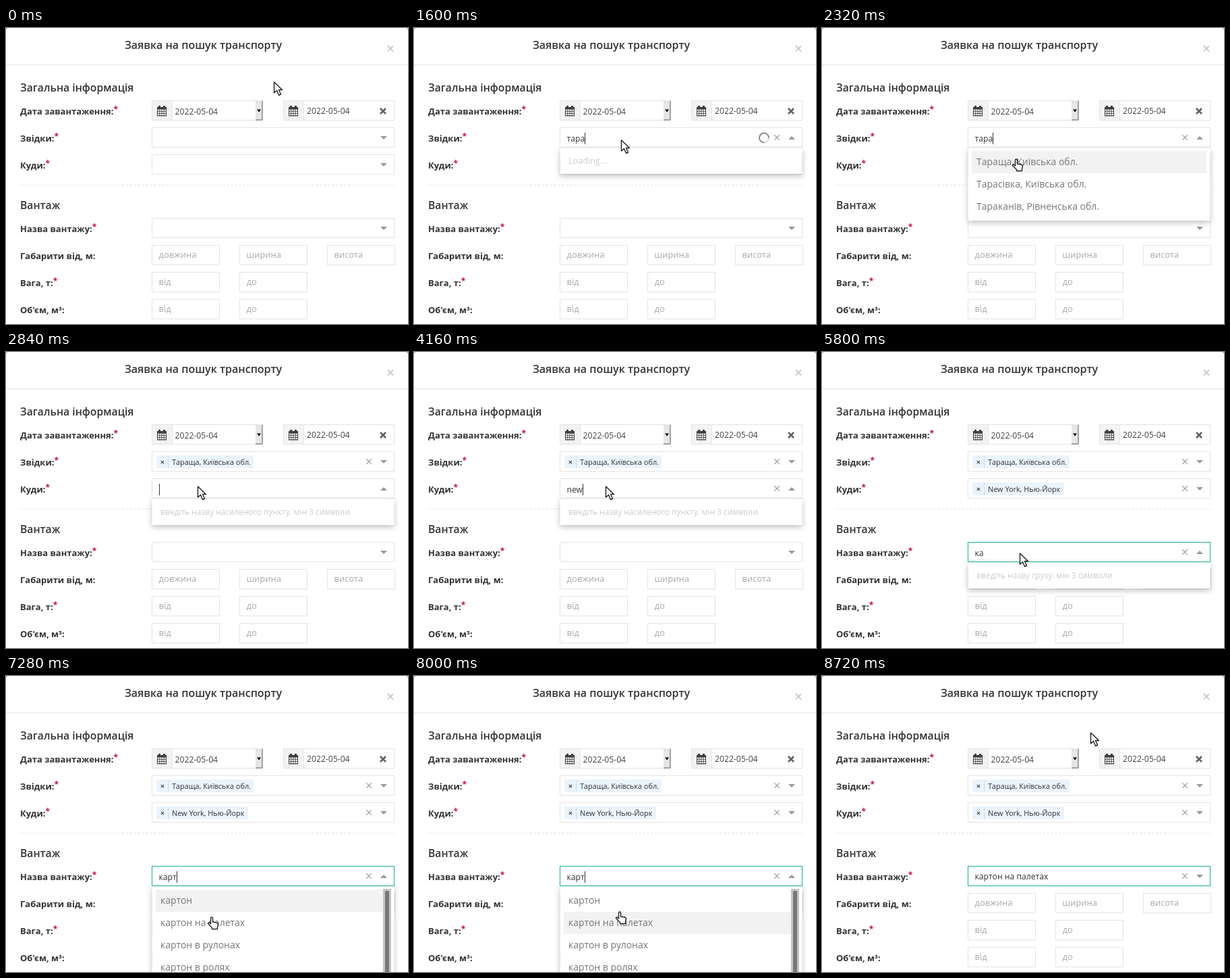
Write an HTML page that moves like this. It is 596x438 px and loops after 8.92 s.

```html
<!DOCTYPE html>
<html lang="uk">
<head>
<meta charset="utf-8">
<style>
html, body { margin: 0; width: 100%; height: 100%; overflow: hidden; background: #fff; }
svg { display: block; font: 13px "Open Sans", "Noto Sans", sans-serif; }
.menu { filter: drop-shadow(0 3px 4px rgba(0, 0, 0, .25)); }
</style>
</head>
<body>
<svg id="stage" width="596" height="438" viewBox="0 0 596 438"></svg>
<script>
const LOOP = 8920, VALUE_SIZE = 12.2;
const stage = document.getElementById("stage");

const text = (x, y, s, fill = "#444", size = 13, weight = 400) =>
  `<text x="${x}" y="${y}" fill="${fill}" font-size="${size}" font-weight="${weight}">${s}</text>`;
const rect = (x, y, w, h, fill, more = "") =>
  `<rect x="${x}" y="${y}" width="${w}" height="${h}" fill="${fill}" ${more}/>`;
const path = (d, fill, more = "") => `<path d="${d}" fill="${fill}" ${more}/>`;
const box = (x, y, w, h, stroke = "#e3e4e5", fill = "#fff") =>
  rect(x + .5, y + .5, w - 1, h - 1, fill, `stroke="${stroke}"`);
const cross = (x, y, r, color, width) =>
  path(`M${x - r} ${y - r}l${2 * r} ${2 * r}m0 ${-2 * r}l${-2 * r} ${2 * r}`, "none",
    `stroke="${color}" stroke-width="${width}"`);
const label = (y, s) => text(21, y,
  s.replace("*", '<tspan dy="-3" font-size="12" fill="#c4104a">*</tspan>'), "#333", 13, 700);

function calendar(x) {
  let s = box(x, 107, 31, 30, "#e3e4e5", "#f3f3f3") +
    rect(x + 8, 117, 14, 13.5, "#3c3c3c") + rect(x + 10, 115, 3, 4, "#3c3c3c") + rect(x + 17, 115, 3, 4, "#3c3c3c");
  for (let i = 0; i < 12; i++)
    s += rect(x + 9 + i % 4 * 3.2, 120.5 + (i >> 2) * 3.2, 2.4, 2.4, "#f3f3f3");
  return s;
}

function form() {
  const dates = box(216, 107, 165, 30) + calendar(216) + text(250.5, 128, "2022-05-04", "#444", VALUE_SIZE) +
    rect(370, 108, 10, 28, "#e6e6e6") + path("M380 108v28h-10", "none", 'stroke="#888" stroke-width="1.4"') +
    path("M372 120.5h6l-3 4z", "#000") +
    box(411, 107, 165, 30) + calendar(411) + text(446, 127, "2022-05-04", "#444", VALUE_SIZE) +
    cross(559, 123, 4, "#666", 2.8);
  const inputs = [[216, 321, "довжина"], [346, 321, "ширина"], [476, 321, "висота"],
    [216, 361, "від"], [346, 361, "до"], [216, 401, "від"], [346, 401, "до"]]
    .map(([x, y, s]) => box(x, y, 101, 30) + text(x + 10.5, y + 19, s, "#aaa")).join("");
  return rect(0, 0, 596, 438, "#fff") + path("M0 0h3q-3 0-3 3zM596 0h-3q3 0 3 3z", "#777") +
    text(176, 31, "Заявка на пошук транспорту", "#333", 16, 600) +
    cross(570, 30.5, 4, "#ccc", 2) + rect(0, 54, 596, 1, "#e5e5e5") +
    text(21, 94, "Загальна інформація", "#333", 15.7, 600) +
    text(21, 268, "Вантаж", "#333", 15.7, 600) +
    path("M21 232.5H576", "none", 'stroke="#e4e6e8" stroke-dasharray="4 2"') +
    label(128, "Дата завантаження:*") + label(168, "Звідки:*") + label(208, "Куди:*") +
    label(302, "Назва вантажу:*") + label(342, "Габарити від, м:") +
    label(382, "Вага, т:*") + label(422, "Об'єм, м³:") + dates + inputs;
}

// Times in ms: keys = one per typed letter, off = spans with the caret blinked out.
const fields = [
  { y: 147, open: 560, word: "тара", keys: [1000, 1120, 1200, 1320], load: 1600, list: 1960, pick: 2560,
    hint: "введіть назву населеного пункту. мін 3 символи", value: "Тараща, Київська обл.", chip: 144,
    off: [], items: ["Тараща, Київська обл.", "Тарасівка, Київська обл.", "Тараканів, Рівненська обл."] },
  { y: 187, open: 2760, word: "new", keys: [3840, 3960, 4080], load: 4280, list: 4480, pick: 4880,
    hint: "введіть назву населеного пункту. мін 3 символи", value: "New York, Нью-Йорк", chip: 136,
    off: [[3080, 3400]], items: ["New York, Нью-Йорк", "New Haven, Коннектикут", "Ньюпорт, Уельс",
      "Newport News, Вірджинія", "Newark, Нью-Джерсі", "Ньюкасл-Апон-Тайн, Англія",
      "New Westminster, Британська Колумбія"] },
  { y: 281, open: 5200, word: "карт", keys: [5560, 5720, 5880, 6000], load: 6200, list: 6400, pick: 8040,
    hint: "введіть назву грузу. мін 3 символи", value: "картон на палетах",
    off: [[5760, 5860], [6480, 6980], [7480, 7980]], items: ["картон", "картон на палетах", "картон в рулонах",
      "картон в ролях"] }
];

const pen = document.createElement("canvas").getContext("2d");
function textWidth(s) {
  pen.font = VALUE_SIZE + 'px "Open Sans", "Noto Sans", sans-serif';
  return pen.measureText(s).width;
}

function spinner(y, angle) {
  return `<g transform="rotate(${angle} 519 ${y})" stroke-width="2">` +
    path(`M519 ${y + 7}a7 7 0 0 0 7-7`, "none", 'stroke="#ddd"') +
    path(`M519 ${y + 7}a7 7 0 1 1 7-7`, "none", 'stroke="#888"') + "</g>";
}

function field(f, t) {
  const { y } = f, picked = t >= f.pick, open = t >= f.open && !picked;
  const typed = f.word.slice(0, f.keys.filter(k => t >= k).length);
  let s = box(216, y, 360, 30, !f.chip && t >= f.open ? "#1ab394" : "#e3e4e5");
  s += path(open ? `M555 ${y + 18}h10l-5-5z` : `M555 ${y + 13}h10l-5 5z`, "#999");
  if (picked || typed) s += cross(538, y + 15, 3.8, "#999", 1.2);
  if (picked && f.chip)
    s += rect(223, y + 6, f.chip, 19, "#ebf4fd", 'rx="2"') +
      rect(240, y + 6, 1, 19, "#c2def6") + cross(232, y + 16, 2.2, "#444", 1.1) +
      text(246, y + 20, f.value, "#333", 10.9);
  else if (picked) s += text(226.5, y + 20, f.value, "#333", VALUE_SIZE);
  else if (open) {
    s += text(226.5, y + 21, typed, "#333", VALUE_SIZE);
    if (!f.off.some(([a, b]) => t >= a && t < b))
      s += rect(Math.round(226.5 + textWidth(typed)), y + 8, 1, 17, "#333");
    if (t >= f.load && t < f.list) s += spinner(y + 15.5, (t - f.load) * .9);
  }
  return s;
}

function menu(f, t) {
  if (t < f.open || t >= f.pick) return "";
  const top = f.y + 30, listed = t >= f.list, n = f.items.length;
  const height = !listed ? 39 : n == 3 ? 108 : 260;
  let s = `<g class="menu">${rect(216.5, top, 359, height, "#fff")}</g>`;
  if (!listed) return s + (t >= f.load
    ? text(229, top + 24, "Loading...", "#ccc", 12.6)
    : text(229, top + 24, f.hint, "#ccc", 12));
  const active = !f.chip && t >= 7300 ? 1 : 0;
  s += rect(222, top + 5 + active * 33, n == 3 ? 348 : 337, 33, "#f2f2f2");
  f.items.forEach((item, i) => s += text(229, top + 26 + i * 33, item, "#777", 14));
  if (n > 3) s += rect(559, top + 4, 12, 260, "#c4c4c4") + rect(562, top + 7, 6, 157, "#777", 'rx="1"');
  return s;
}

// Pointer stops: time, x, y.
const stops = [[80, 398, 79], [560, 308, 165], [2040, 308, 165], [2400, 285, 198], [4480, 285, 198],
  [4760, 312, 240], [4920, 312, 240], [5180, 288, 297], [5360, 288, 297], [5400, 294, 297],
  [7160, 294, 297], [7280, 305, 357], [7640, 305, 357], [7840, 305, 350], [8080, 305, 348],
  [8400, 385, 230], [8560, 425, 130], [8720, 399, 83]];

function pointer(t) {
  const i = stops.findIndex(p => p[0] > t);
  const b = stops[i < 0 ? stops.length - 1 : i], a = i < 1 ? b : stops[i - 1];
  const k = a == b ? 0 : (t - a[0]) / (b[0] - a[0]), e = k * k * (3 - 2 * k);
  const x = Math.round(a[1] + (b[1] - a[1]) * e), y = Math.round(a[2] + (b[2] - a[2]) * e);
  const hand = fields.some(f => t >= f.list && t < f.pick && y > f.y + 30);
  const shape = hand
    ? "M-1 9V1q0-2 1.5-2t1.5 2v5l6 1q2 .5 2 2.500l-1 4v3H1v-2l-6-6q0-2 2-1.500z"
    : "M0 0v16l4-3.500 3 7 3-1.500-3-6.500h5z";
  return `<g transform="translate(${x - .5} ${y + 1})">` +
    path(shape, "#fff", 'stroke="#222" stroke-width="1.4" stroke-linejoin="round"') + "</g>";
}

function draw(now) {
  const t = now % LOOP;
  stage.innerHTML = form() + fields.map(f => field(f, t)).join("") +
    fields.map(f => menu(f, t)).join("") + pointer(t);
  requestAnimationFrame(draw);
}
requestAnimationFrame(draw);
</script>
</body>
</html>
```
